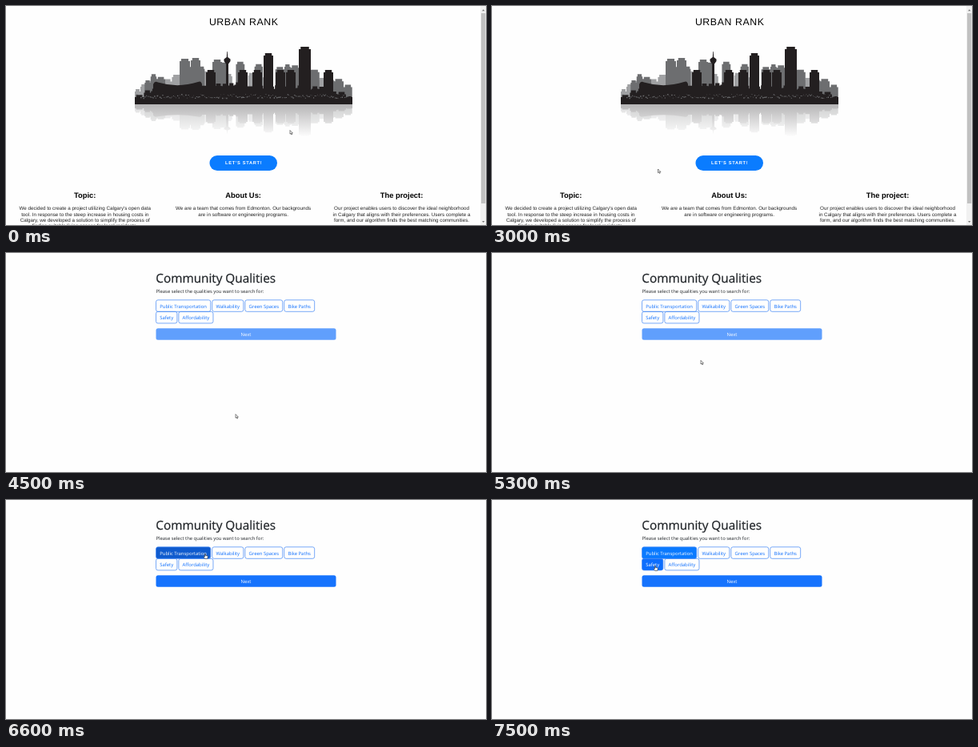
Write an HTML page that moves like this. It is 600 by 274 pixels and loops after 8 s.

```html
<!DOCTYPE html>
<html lang="en">
<head>
<meta charset="utf-8">
<style>
  html, body { margin: 0; width: 100%; height: 100%; overflow: hidden; background: #fefefe; }
  svg { display: block; width: 100vw; height: 100vh; }
  text { text-rendering: geometricPrecision; }
  #landing { font: 6.25px "Liberation Sans", Arial, sans-serif; fill: #222; text-anchor: middle; }
  #landing .title { font-size: 12.3px; letter-spacing: .6px; fill: #000; }
  #landing .head { font-size: 9.4px; font-weight: bold; fill: #000; }
  #landing .start { font-size: 5.7px; font-weight: bold; letter-spacing: .7px; fill: #fff; }
  #form { font: 5.9px "Open Sans", "Noto Sans", sans-serif; fill: #212529; }
  #form .title { font-size: 15.3px; stroke: #212529; stroke-width: .25; }
  #form .label { text-anchor: middle; }
</style>
</head>
<body>
<svg viewBox="0 0 600 274" preserveAspectRatio="none">
  <defs>
    <linearGradient id="fade" x2="0" y2="1">
      <stop offset="0" stop-color="#fefefe" stop-opacity="0"/>
      <stop offset="1" stop-color="#fefefe"/>
    </linearGradient>
    <g id="skyline">
      <path id="far" fill="#a0a1a3"/>
      <path id="back" fill="#6d6e70"/>
      <path id="front" fill="#231f20"/>
      <path fill="#231f20" d="M161 114H433V123H161Z"/>
      <path fill="#231f20" d="M184 115V98Q186 93 190 95.5Q215 103 240 95Q244 93 245 98V115Z"/>
      <path fill="#231f20" d="M276.2 57H276.8L277.2 64 280.5 66.5V69L278 72.5V115H275V72.5L272.5 69V66.5L275.8 64Z"/>
    </g>
  </defs>

  <g id="landing">
    <text class="title" x="297.2" y="24.4">URBAN RANK</text>
    <use href="#skyline" opacity=".32" transform="translate(0 191) scale(1 -.553)"/>
    <rect x="160" y="123" width="275" height="41" fill="url(#fade)"/>
    <use href="#skyline"/>
    <path id="crowd" fill="#6d6e70"/>
    <rect x="254.5" y="187" width="84.5" height="19" rx="9.5" fill="#0a7cff"/>
    <text class="start" x="297.2" y="198.4">LET'S START!</text>
    <g id="columns"></g>
    <path fill="#f1f1f1" d="M593 0H600V274H593Z"/>
    <path fill="#c1c1c1" d="M594 9H599.3V247H594Z"/>
    <path fill="#777" d="M595 6.2L596.7 4.2 598.4 6.2ZM595 269L596.7 271 598.4 269Z"/>
  </g>

  <g id="form">
    <text class="title" x="187.3" y="36.6">Community Qualities</text>
    <text x="187.5" y="50.2">Please select the qualities you want to search for:</text>
    <g id="chips"></g>
    <rect id="next" x="187.5" y="94.2" width="225" height="14.6" rx="2.5" fill="#0d6efd"/>
    <text class="label" x="300" y="104" fill="#fff">Next</text>
  </g>

  <g id="cursor" fill="#fff" stroke="#222" stroke-width=".55" stroke-linejoin="round">
    <path id="arrow" d="M0 0V4.7L1.1 3.7 1.9 5.5 2.7 5.1 1.9 3.5H3.4Z"/>
    <path id="hand" d="M-.5 0Q0-.5 .5 0V2L2.9 2.5Q3.4 2.7 3.3 3.4L2.7 6H-.3L-1.9 3.7Q-1.8 2.8-.5 3.5Z"/>
  </g>
</svg>

<script>
const LOOP = 8000, STEP = 100, FORM_AT = 4400, CLICK_AT = 6500, FADE = 190;
const LEFT = 161, RIGHT = 433, GROUND = 123;
const $ = id => document.getElementById(id);
const lerp = (a, b, k) => a + (b - a) * k;

function add(parent, tag, attrs, content = '') {
  const node = document.createElementNS('http://www.w3.org/2000/svg', tag);
  for (const key in attrs) node.setAttribute(key, attrs[key]);
  node.textContent = content;
  return parent.appendChild(node);
}

let seed = 7;
const random = () => (seed = seed * 16807 % 2147483647) / 2147483647;

// A building whose top narrows in one step.
const tower = (x, width, top) =>
  `M${x} ${GROUND}V${top + 3}h${width * .15}V${top}h${width * .7}v3h${width * .15}V${GROUND}Z`;

// A row of random buildings, lower towards both ends of the skyline.
function row(height, density) {
  let d = '';
  for (let x = LEFT, width; x < RIGHT - 3; x += width) {
    width = Math.min(7 + random() * 6, RIGHT - x);
    const envelope = Math.sin(Math.PI * (x + width / 2 - LEFT) / (RIGHT - LEFT)) ** .27;
    const top = GROUND - height * envelope * (.8 + .2 * random());
    if (random() < density) d += tower(x, width, top);
  }
  return d;
}

const midrises = [250, 290, 308, 337, 350, 397].map(x => tower(x, 12, 80));
$('far').setAttribute('d', row(46, .8));
$('back').setAttribute('d', row(54, .55) + tower(217, 13, 66) + tower(231, 12, 65) + tower(258, 12, 67));
$('front').setAttribute('d', row(28, 1) + midrises.join('') + tower(322, 12, 59) + tower(366, 15, 51));

let crowd = '';
for (let x = LEFT + 2; x < RIGHT - 2; x += 1.7) {
  const size = .5 + random();
  crowd += `M${x} ${110 + random() * 5}h${size}v${size}h${-size}z`;
}
$('crowd').setAttribute('d', crowd);

const columns = [
  ['Topic:', "We decided to create a project utilizing Calgary's open data",
    'tool. In response to the steep increase in housing costs in',
    'Calgary, we developed a solution to simplify the process of',
    'finding suitable living spaces for local residents.'],
  ['About Us:', 'We are a team that comes from Edmonton. Our backgrounds',
    'are in software or engineering programs.'],
  ['The project:', 'Our project enables users to discover the ideal neighborhood',
    'in Calgary that aligns with their preferences. Users complete a',
    'form, and our algorithm finds the best matching communities.']
];
columns.forEach(([head, ...lines], column) => {
  const x = 98.7 + column * 197.9;
  add($('columns'), 'text', { x, y: 240, class: 'head' }, head);
  lines.forEach((line, i) => add($('columns'), 'text', { x, y: 255.4 + i * 7.2 }, line));
});

// Chips flow from the left, each as wide as its label plus padding.
const chips = [];
const chipRows = [
  ['Public Transportation', 'Walkability', 'Green Spaces', 'Bike Paths'],
  ['Safety', 'Affordability']
];
chipRows.forEach((labels, i) => {
  let left = 187.5;
  const top = 58.8 + i * 14.6;
  for (const label of labels) {
    const box = add($('chips'), 'rect', {
      x: left, y: top, height: 14.5, rx: 2.4, stroke: '#3f86f5', 'stroke-width': .7
    });
    const text = add($('chips'), 'text', { y: top + 9.8, class: 'label' }, label);
    const width = text.getComputedTextLength() + 9.5;
    box.setAttribute('width', width);
    text.setAttribute('x', left + width / 2);
    chips.push({ box, text, area: [left, top, width, 14.5], clickable: label.startsWith('Public') });
    left += width + 2;
  }
});

// Cursor moves: start, end, x, y.
const moves = [
  [0, 0, 355, 155.5], [900, 1300, 336, 87.5], [2200, 3000, 207.5, 204], [3300, 4100, 287, 201.7],
  [5100, 5500, 235, 67], [5700, 6000, 330, 68], [6000, 6300, 249, 67.5], [6800, 7400, 204, 82.5]
];
function cursorAt(t) {
  let x = 0, y = 0;
  for (const [start, end, toX, toY] of moves) {
    if (t < start) break;
    const k = t >= end ? 1 : (t - start) / (end - start);
    x = lerp(x, toX, k);
    y = lerp(y, toY, k);
  }
  return [x, y];
}

const over = ([x, y], [left, top, width, height]) =>
  x >= left && x <= left + width + 1 && y >= top && y <= top + height;

// Share of the last FADE ms that the cursor spent over the area.
function hoverStrength(area, t) {
  const samples = 20;
  let hits = 0;
  for (let i = 0; i < samples; i++) hits += over(cursorAt(t - FADE * i / samples), area);
  return hits / samples;
}

const mix = (from, to, k) => `rgb(${from.map((c, i) => lerp(c, to[i], k))})`;
const BLUE = [13, 110, 253], BRIGHT = [10, 122, 255], DARK = [15, 91, 206], WHITE = [255, 255, 255];

function draw(t) {
  const onForm = t >= FORM_AT;
  const show = (id, visible) => $(id).style.display = visible ? '' : 'none';
  show('landing', !onForm);
  show('form', onForm);

  const point = cursorAt(t);
  const targets = onForm ? chips.map(chip => chip.area) : [[254.5, 187, 84.5, 19]];
  const pointing = targets.some(area => over(point, area));
  $('cursor').setAttribute('transform', `translate(${point})`);
  show('arrow', !pointing);
  show('hand', pointing);

  for (const { box, text, area, clickable } of chips) {
    const hover = hoverStrength(area, t);
    const selected = clickable && t >= CLICK_AT;
    const strength = selected ? 1 : hover;
    box.setAttribute('fill', selected ? mix(BRIGHT, DARK, hover) : mix(BLUE, BLUE, 0));
    box.setAttribute('fill-opacity', strength);
    text.setAttribute('fill', mix(BLUE, WHITE, strength));
  }
  $('next').setAttribute('fill-opacity', t < CLICK_AT ? .65 : .96);
}

function tick() {
  const t = performance.now() % LOOP;
  draw(Math.floor(t / STEP) * STEP);
  requestAnimationFrame(tick);
}
tick();
</script>
</body>
</html>
```
